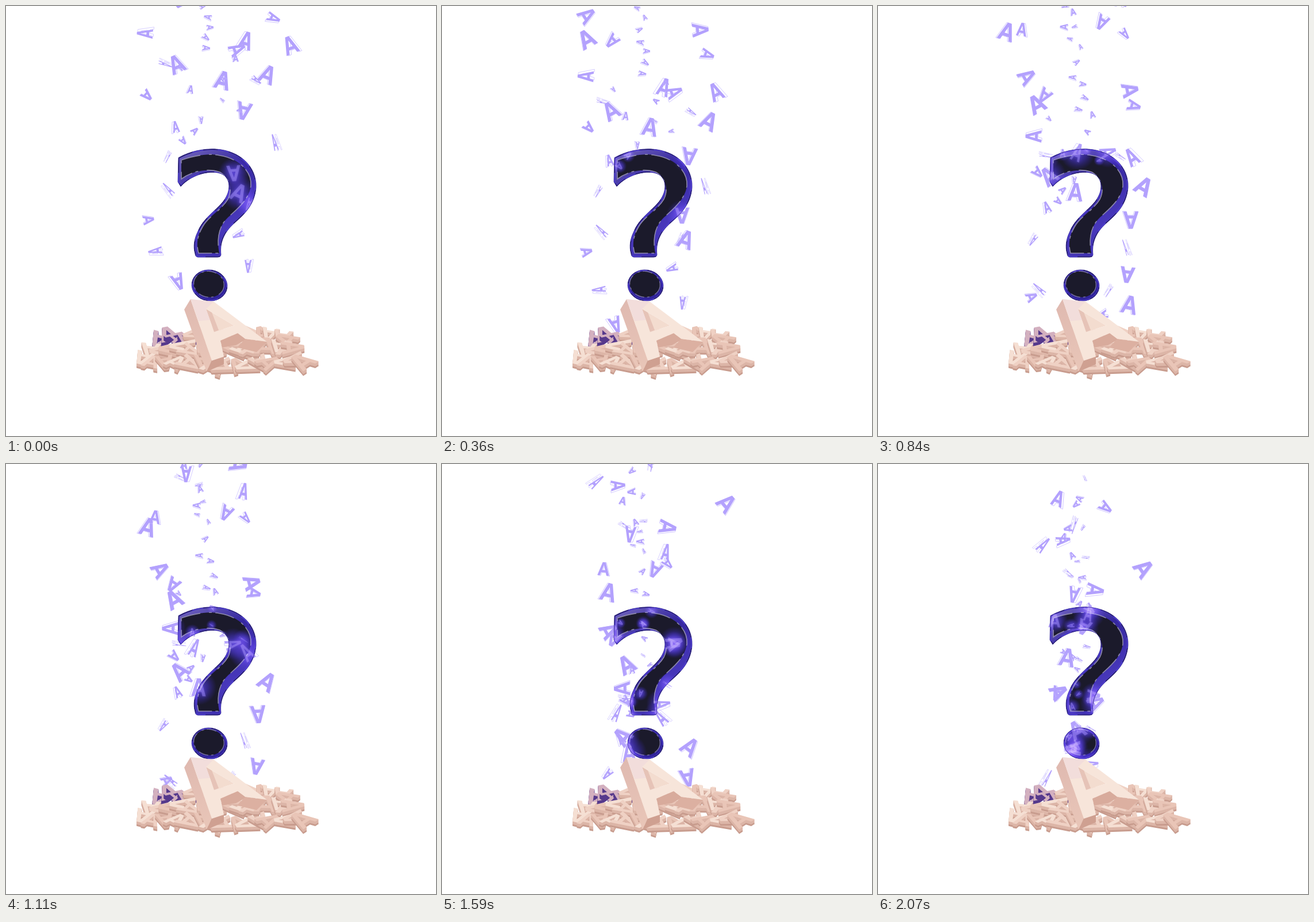
Animation, 748 px wide and 748 px high, one loop 2130 ms. Source, as an HTML page with a canvas:

```html
<!DOCTYPE html>
<html lang="en">
<head>
<meta charset="utf-8">
<title>Falling letters</title>
<style>
  html, body { margin: 0; width: 100%; height: 100%; overflow: hidden; background: #fff; }
  canvas { display: block; width: 100vw; height: 100vh; }
</style>
</head>
<body>
<canvas id="stage" width="748" height="748"></canvas>
<script>
const ctx = document.getElementById('stage').getContext('2d');
const LOOP = 2130, STEPS = 31, TAU = Math.PI * 2;

const LETTER = new Path2D(
  'M-.46 .5L-.12-.5H.12L.46 .5H.25L.18 .27H-.18L-.25 .5ZM0-.28L.12 .1H-.12Z');
const MARK = new Path2D(
  'M300 264C325 250 350 248 366 249C408 252 436 280 435 315C433 345 415 362 398 377' +
  'C383 390 371 408 374 433Q373 437 368 437H334Q329 436 329 431C325 418 328 404 333 394' +
  'C342 370 364 357 377 341C390 325 392 306 380 295C365 283 325 290 304 314L299 306Z');
const FACE = new Path2D(
  'M305 268C330 259 355 256 372 260C408 266 428 290 426 313C422 340 398 356 384 370' +
  'C371 383 366 405 371 430H335C330 412 334 398 342 384C352 366 374 356 386 336' +
  'C396 315 386 297 372 289C352 282 325 286 305 301Z');
const DOT = new Path2D(), DOT_FACE = new Path2D();
DOT.ellipse(354, 486, 31, 27, .15, 0, TAU);
DOT_FACE.ellipse(353, 484, 26.5, 22.5, .15, 0, TAU);
const GLASS = new Path2D(MARK);
GLASS.addPath(DOT);

let seed = 19;
function rnd(lo, hi) {
  seed = (seed * 16807) % 2147483647;
  return lo + (hi - lo) * seed / 2147483647;
}
const times = (count, make) => Array.from({ length: count }, (_, i) => make(i));

// A letter circles the axis, widest at step `peak`, while it falls.
function makeLetter(radius, peak, y, size, turn, lean) {
  return {
    radius, peak, y, size,
    angle: rnd(-turn, turn), spin: rnd(-.02, .02),
    lean: rnd(-lean, lean), tumble: rnd(-.03, .03)
  };
}

// Radius, peak and start height of the most visible letters
const leads = [
  [-110, 0, -24], [145, -2, 68], [138, 14, 119], [125, -20, 60], [60, -22, 129],
  [122, 22, 325], [-65, 12, 101], [-170, 3, -150], [222, 22, -305]
];
const letters = [
  ...leads.map(lead => makeLetter(...lead, 31, .5, .6)),
  ...times(34, i => makeLetter(
    (i % 2 ? 1 : -1) * rnd(50, 125), rnd(-6, 24), 480 - i * 27, rnd(18, 30), Math.PI, 1.5)),
  ...times(26, i => makeLetter(
    rnd(-65, 65), rnd(-10, 35), 235 - i * 18, rnd(9, 14), Math.PI, 1.2))
];

function pose(p, n) {
  const lean = p.lean + p.tumble * n;
  return {
    x: 350 + p.radius * (1 - .015 * n) * Math.cos(.05 * (n - p.peak)),
    y: p.y + n * (3.5 + .41 * p.size),
    size: p.size,
    angle: p.angle + p.spin * n,
    width: Math.max(.16, Math.cos(lean)),
    depth: .2 * Math.sin(lean)
  };
}

function place(p, shift, draw) {
  ctx.save();
  ctx.translate(p.x, p.y);
  ctx.rotate(p.angle);
  ctx.scale(p.size, p.size);
  ctx.translate(shift, Math.abs(shift) * .3);
  ctx.scale(p.width, 1);
  draw();
  ctx.restore();
}

function drawLetter(p) {
  place(p, p.depth, () => {
    ctx.lineWidth = .8 / p.size;
    ctx.strokeStyle = '#c5b9ff';
    ctx.stroke(LETTER);
  });
  place(p, 0, () => {
    ctx.fillStyle = '#b3a1fd';
    ctx.fill(LETTER, 'evenodd');
  });
}

function line(path, color, width, dash = []) {
  ctx.setLineDash(dash);
  ctx.strokeStyle = color;
  ctx.lineWidth = width;
  ctx.stroke(path);
  ctx.setLineDash([]);
}

function drawGlass(poses) {
  const rim = ctx.createLinearGradient(300, 250, 430, 450);
  ['#7468bd', '#35279f', '#4838bb', '#30239a'].forEach((c, i) => rim.addColorStop(i / 3, c));
  ctx.fillStyle = rim;
  ctx.fill(GLASS);
  ctx.save();
  ctx.clip(GLASS);
  line(GLASS, '#4c3ccb', 4);
  line(GLASS, '#1d1848', 2.5, [26, 19]);
  ctx.fillStyle = '#1b1a2b';
  ctx.fill(FACE);
  ctx.fill(DOT_FACE);
  line(FACE, '#8c88aa', 1.6, [34, 15, 5, 6]);
  line(DOT_FACE, '#716c9a', 1.4, [17, 10, 4, 5]);
  ctx.globalCompositeOperation = 'screen';
  for (const p of poses) {
    if (p.y < 235 || p.y > 525) continue;
    const r = p.size;
    const glow = ctx.createRadialGradient(p.x, p.y, 0, p.x, p.y, r);
    glow.addColorStop(0, 'rgba(70,46,245,.75)');
    glow.addColorStop(.5, 'rgba(54,32,215,.5)');
    glow.addColorStop(1, 'rgba(40,20,200,0)');
    ctx.fillStyle = glow;
    ctx.fillRect(p.x - r, p.y - r, r * 2, r * 2);
    place(p, 0, () => {
      ctx.shadowColor = '#5b40ff';
      ctx.shadowBlur = 5;
      ctx.fillStyle = 'rgba(125,112,240,.45)';
      ctx.fill(LETTER, 'evenodd');
    });
  }
  ctx.restore();
  line(GLASS, 'rgba(52,40,150,.75)', 1);
}

function layLetter({ x, y, size, angle, violet, face }) {
  const layer = (dy, color) => {
    ctx.save();
    ctx.translate(x, y + dy);
    ctx.scale(size, size * .62);
    ctx.rotate(angle);
    ctx.fillStyle = color;
    ctx.fill(LETTER, 'evenodd');
    ctx.restore();
  };
  for (let d = 8; d > 0; d--) {
    layer(d, violet ? '#56398c' : d > 5 ? '#c89c8e' : '#dcb5a7');
  }
  layer(0, violet ? '#d3b0bf' : face);
}

// Three rows from back to front, lowest in the middle
const FACES = ['#f5dfd3', '#efd1c4', '#e9c5b7'];
const pile = times(45, i => {
  const row = Math.floor(i / 15), u = (i % 15) / 7 - 1;
  const x = 379 + u * (112 + row * 14) + rnd(-6, 6);
  const dip = row * (20 + 7 * (1 - Math.abs(u)));
  return {
    x, y: 568 + 8 * Math.abs(u) + dip + rnd(-5, 5),
    size: rnd(32, 46), angle: rnd(-Math.PI, Math.PI),
    violet: row === 0 && x < 315, face: FACES[i % 3]
  };
});

function poly(color, ...rings) {
  ctx.beginPath();
  for (const ring of rings) {
    ctx.moveTo(ring[0], ring[1]);
    for (let i = 2; i < ring.length; i += 2) ctx.lineTo(ring[i], ring[i + 1]);
    ctx.closePath();
  }
  ctx.fillStyle = color;
  ctx.fill('evenodd');
}

function drawBigLetter() {
  const hole = [348, 527, 397, 556, 362, 567];
  poly('#f3dccf', hole);
  poly('#e6c3b7', [348, 527, 362, 567, 370, 564, 358, 533]);
  poly('#d8ab9c', [373, 582, 403, 569, 418, 580, 400, 590, 376, 594]);
  poly('#dcb0a1', [454, 584, 436, 602, 402, 594, 416, 579]);
  const side = ctx.createLinearGradient(315, 512, 350, 636);
  side.addColorStop(0, '#dfb9b0');
  side.addColorStop(1, '#e9c6b8');
  poly(side, [321, 510, 310, 528, 349, 636, 358, 616]);
  poly('#cfa091', [358, 616, 379, 609, 379, 623, 349, 636]);
  poly('#f7e5da',
    [321, 510, 361, 514, 454, 584, 416, 579, 403, 569, 373, 582, 379, 610, 358, 617], hole);
  poly('rgba(228,196,220,.25)', [321, 510, 361, 514, 348, 527, 355, 546, 335, 548]);
}

// Steps are evenly spaced and snap up to a 30 ms grid.
function stepAt(t) {
  let n = 0;
  while (n < STEPS - 1 && Math.ceil((n + 1) * 68.2 / 30) * 30 <= t) n++;
  return n;
}

function render(n) {
  ctx.fillStyle = '#fff';
  ctx.fillRect(0, 0, 748, 748);
  const poses = letters.map(p => pose(p, n)).filter(p => p.y > -30 && p.y < 555);
  poses.forEach(drawLetter);
  drawGlass(poses);
  pile.forEach(layLetter);
  drawBigLetter();
}

const start = performance.now();
let shown = -1;
function tick() {
  const n = stepAt((performance.now() - start) % LOOP);
  if (n !== shown) render(shown = n);
  requestAnimationFrame(tick);
}
tick();
</script>
</body>
</html>
```
